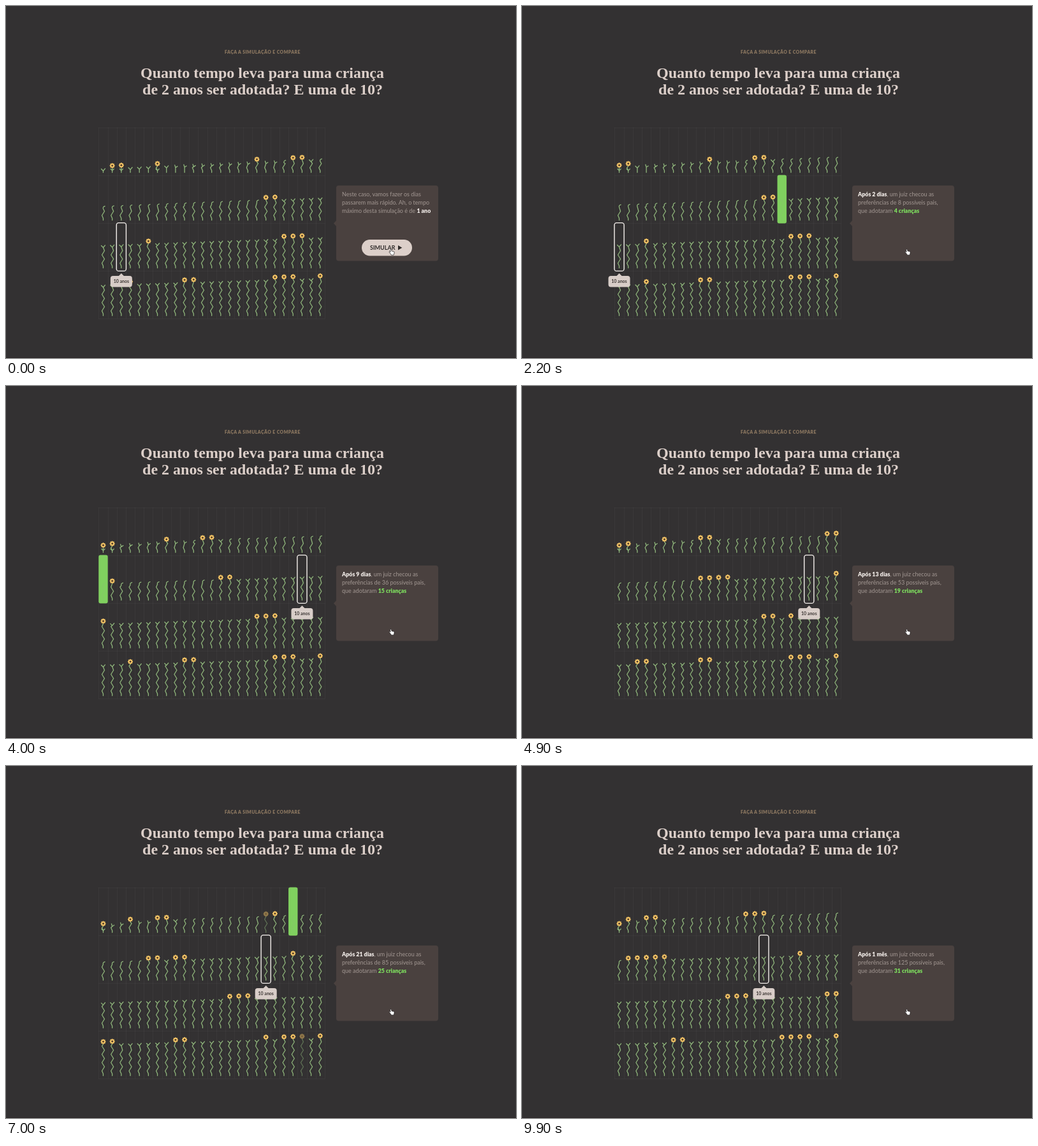
An HTML page with a canvas that plays this animation: 800x553 px, repeating every 10 s.

```html
<!DOCTYPE html>
<html lang="pt-BR">
<head>
<meta charset="utf-8">
<title>Simulação</title>
<style>
  html, body { margin: 0; width: 100%; height: 100%; overflow: hidden; background: #333132; }
  canvas, svg { position: absolute; left: 0; top: 0; width: 800px; height: 553px; }
  text { white-space: pre; font-family: Lato, sans-serif; }
  .eyebrow { font-size: 6.9px; font-weight: 900; letter-spacing: .45px; fill: #8f7a62; }
  .title { font: 700 24px "Liberation Serif", "Noto Serif", serif; fill: #dccfc9; }
  .note { font-size: 9px; fill: #a39893; }
  .strong, .count { font-size: 8.8px; font-weight: 900; }
  .strong { fill: #f5efeb; }
  .count { fill: #7fe25f; }
  .button { font-size: 9px; font-weight: 700; fill: #2f2b2a; }
  .tip { font-size: 7px; font-weight: 700; fill: #3a3432; }
</style>
</head>
<body>
<canvas></canvas>
<svg viewBox="0 0 800 553">
  <text class="eyebrow" x="402.5" y="75" text-anchor="middle">FAÇA A SIMULAÇÃO E COMPARE</text>
  <text class="title" x="402" y="113" text-anchor="middle">Quanto tempo leva para uma criança</text>
  <text class="title" x="402.5" y="139" text-anchor="middle">de 2 anos ser adotada? E uma de 10?</text>
  <text class="note" x="527" y="299"></text>
  <text class="note" x="527" y="312"></text>
  <text class="note" x="527" y="325"></text>
  <g id="button">
    <rect x="558" y="367" width="79" height="25.5" rx="12.7" fill="#dccfc9"/>
    <text class="button" x="571" y="383">SIMULAR</text>
    <path d="M615 376v7.4l6.3-3.7z" fill="#2f2b2a"/>
  </g>
  <path d="M603.2 389.2l-2-2.4q-.5-1.1.7-1.2l1.3.8-.6-3.2q.1-1.2 1-1.1.7 0 .9 1l.5 1.9 3 .5q1.2.4 1.1 1.7l-.4 2.4-.7 1.6h-3.6z"
    fill="#fff" stroke="#1d1a1a" stroke-width=".7" stroke-linejoin="round"/>
  <text class="tip" id="tip" text-anchor="middle">10 anos</text>
</svg>
<script>
const LOOP = 10000, STEP = 100;
const COLS = 25, CELLS = 100, LEFT = 145.4, PITCH = 14.18, TOP = 191, ROW = 75;
const STEM = '#90b77c', PETAL = '#f4c566', CORE = '#4a3323', PALE = '#d8cdc8';
const MARKED = 52;

// Plants are numbered by age. The queue moves left: how far, and how late, by age.
const reach = [
  [0, 0], [6, 6], [17, 16], [22, 18], [45, 14.9], [52, 10.8], [72, 7.8], [84, 3], [96, 1], [99, 0]
];
const delay = [[0, 0], [44, 1], [52, .85], [73, 1.5], [84, 3.5], [99, 4]];

const inBloom = [1, 2, 6, 17, 21, 22, 43, 44, 55, 70, 71, 72, 78, 84, 85, 94, 95, 96, 99];
// [age, moment of blooming]
const laterBlooms = [
  [33, 2900], [32, 3400], [41, 4500], [42, 4500], [79, 4700], [31, 7000], [97, 7000], [45, 9000]
];
const blooms = [...inBloom.map(age => [age, -LOOP]), ...laterBlooms];

// Totals by day
const couples = [[1, 3], [5, 22], [9, 36], [15, 62], [27, 108], [33, 125]];
const children = [[1, 2], [5, 11], [9, 15], [15, 21], [27, 29], [33, 31]];

const canvas = document.querySelector('canvas');
const ctx = canvas.getContext('2d');
const dpr = window.devicePixelRatio || 1;
canvas.width = 800 * dpr;
canvas.height = 553 * dpr;
const button = document.getElementById('button');
const tip = document.getElementById('tip');
const notes = document.querySelectorAll('.note');

const clamp = x => Math.min(1, Math.max(0, x));

function curve(points, x) {
  let i = 1;
  while (i < points.length - 1 && points[i][0] < x) i++;
  const [x0, y0] = points[i - 1], [x1, y1] = points[i];
  return y0 + (y1 - y0) * clamp((x - x0) / (x1 - x0));
}

function cellOf(age, t) {
  if (t < 1300) return age;
  const first = age > 3 && age < 75 ? 1 : 0;
  const end = age > 50 ? 8400 : 9900;
  const u = clamp((t - 1500) / (end - 1500));
  const moved = u ? (curve(reach, age) - first) * u ** curve(delay, age) : 0;
  return age - Math.round(first + moved);
}

const heightOf = age => 10 + .65 * age - .0012 * age * age;
const cellX = p => LEFT + PITCH * (p % COLS + .5);
const cellTop = p => TOP + ROW * Math.floor(p / COLS);

function box(x, y, w, h, r) {
  ctx.beginPath();
  ctx.roundRect(x, y, w, h, r);
}

function flower(x, y) {
  ctx.fillStyle = PETAL;
  ctx.beginPath();
  for (let i = 0; i < 8; i++) {
    const a = i * Math.PI / 4, px = x + 3 * Math.cos(a), py = y + 3 * Math.sin(a);
    ctx.moveTo(px + 1.15, py);
    ctx.arc(px, py, 1.15, 0, 7);
  }
  ctx.moveTo(x + 2.7, y);
  ctx.arc(x, y, 2.7, 0, 7);
  ctx.fill();
  ctx.fillStyle = CORE;
  ctx.beginPath();
  ctx.arc(x, y, 1.4, 0, 7);
  ctx.fill();
}

function crown(x, top, age) {
  if (age < 8 || (age > 20 && age < 24) || age > 42) {
    ctx.moveTo(x - 3, top - 3);
    ctx.lineTo(x, top);
    ctx.lineTo(x + 3, top - 3.6);
  } else if (age < 20) {
    ctx.lineTo(x - 1.2, top - 4);
    ctx.moveTo(x, top);
    ctx.lineTo(x + 3, top - 2);
  } else {
    ctx.quadraticCurveTo(x - 1, top - 3, x + 2.6, top - 4);
  }
}

function plant(x, base, age, open) {
  const full = heightOf(age);
  const height = full - (open ? 4 : 7.5);
  const top = base - height;
  let side = -1;
  ctx.beginPath();
  ctx.moveTo(x, base);
  ctx.lineTo(x, base - Math.min(3, height));
  for (let y = 7.5; y < height - 1; y += 6.5) {
    ctx.lineTo(x + side * 2, base - y);
    side = -side;
  }
  ctx.lineTo(x, top);
  if (!open) crown(x, top, age);
  else if (full < 18) {
    ctx.moveTo(x - 2.6, base - 5.5);
    ctx.lineTo(x, base - 3);
    ctx.lineTo(x + 2.6, base - 5.5);
  }
  ctx.stroke();
  if (open) flower(x, base - full);
}

function grid() {
  ctx.strokeStyle = 'rgba(255,255,255,.035)';
  ctx.lineWidth = 1;
  ctx.beginPath();
  for (let i = 0; i <= COLS; i++) {
    const x = Math.round(LEFT + i * PITCH) + .5;
    ctx.moveTo(x, TOP);
    ctx.lineTo(x, TOP + 4 * ROW);
  }
  for (let r = 0; r <= 4; r++) {
    ctx.moveTo(LEFT, TOP + r * ROW + .5);
    ctx.lineTo(LEFT + COLS * PITCH, TOP + r * ROW + .5);
  }
  ctx.stroke();
}

// Two adoptions per 1200 ms, each flashing for 300 ms
function adoptionAt(t) {
  if (t < 1600) return null;
  const round = Math.floor((t - 1600) / 1200), time = (t - 1600) % 1200;
  const late = time >= 500;
  const age = late ? time - 500 : time;
  return age < 300 ? { cell: (36 + 17 * round + (late ? 7 : 0)) % 45, folding: age >= 200 } : null;
}

function adopted(p, folding, age) {
  const x = cellX(p), y = cellTop(p);
  if (!folding) {
    ctx.fillStyle = '#80d05f';
    box(x - 7.2, y - .5, 14.4, 76, 3);
    ctx.fill();
    ctx.globalAlpha = .3;
    plant(x, y + 70, age, false);
    ctx.globalAlpha = 1;
    return;
  }
  ctx.fillStyle = '#5d9350';
  ctx.beginPath();
  ctx.moveTo(x - 5, y);
  ctx.lineTo(x + 5, y);
  ctx.quadraticCurveTo(x + 7.5, y, x + 7.5, y + 3);
  ctx.lineTo(x + 7.5, y + 72);
  ctx.quadraticCurveTo(x + 7.5, y + 75, x + 5, y + 75);
  ctx.lineTo(x - .5, y + 75);
  ctx.lineTo(x - 1, y + 64);
  ctx.quadraticCurveTo(x + 5, y + 58, x + 6, y + 36);
  ctx.lineTo(x + 6, y + 14);
  ctx.quadraticCurveTo(x + 5, y + 5, x - 1, y + 4);
  ctx.fill();
  ctx.globalAlpha = .75;
  for (let i = 0; i < 3; i++) {
    plant(x - 2 + i * 2.5, y + 66, age + 8 * i, false);
    flower(x - 1 + i % 2 * 6, y + 38 + i * 6.5);
  }
  ctx.globalAlpha = 1;
}

function panel() {
  ctx.fillStyle = '#4a413f';
  box(518, 282, 160, 118.5, 4);
  ctx.fill();
  ctx.beginPath();
  ctx.moveTo(518.5, 336.5);
  ctx.lineTo(514, 341.5);
  ctx.lineTo(518.5, 346.5);
  ctx.fill();
}

function mark(p) {
  const x = cellX(p), y = cellTop(p);
  ctx.strokeStyle = '#f4efec';
  ctx.lineWidth = 1.4;
  box(x - 7.6, y - .4, 15.2, 75.8, 3.5);
  ctx.stroke();
  ctx.fillStyle = PALE;
  box(x - 17, y + 83, 34, 17.5, 4);
  ctx.fill();
  ctx.beginPath();
  ctx.moveTo(x - 4.5, y + 83.5);
  ctx.lineTo(x, y + 79);
  ctx.lineTo(x + 4.5, y + 83.5);
  ctx.fill();
  tip.setAttribute('x', x);
  tip.setAttribute('y', y + 94.3);
}

const span = (cls, s) => `<tspan class="${cls}">${s}</tspan>`;

function story(t) {
  if (t < 1300) return [
    'Neste caso, vamos fazer os dias',
    'passarem mais rápido. Ah, o tempo',
    'máximo desta simulação é de ' + span('strong', '1 ano')
  ];
  const day = Math.max(1, 1 + Math.floor((t - 1950) / 245));
  const pairs = Math.round(curve(couples, day));
  const kids = span('count', Math.round(curve(children, day)) + ' crianças');
  if (day === 1) return [
    span('strong', 'No primeiro dia') + ', um juiz checou as',
    `preferências de ${pairs} possíveis pais, que`,
    'adotaram ' + kids
  ];
  return [
    span('strong', 'Após ' + (day < 30 ? day + ' dias' : '1 mês')) + ', um juiz checou as',
    `preferências de ${pairs} possíveis pais,`,
    'que adotaram ' + kids
  ];
}

function agesAt(t) {
  const ages = [];
  for (let age = 0; age < CELLS; age++) {
    const p = cellOf(age, t);
    while (ages.length <= p) ages.push(age);
    ages[p] = age;
  }
  return ages;
}

function garden(t) {
  const ages = agesAt(t), open = new Map();
  for (const [age, start] of blooms) {
    const p = cellOf(age, t);
    if (t >= start) open.set(p, t < start + 200 ? .5 : 1);
    if (t >= start) ages[p] = age;
  }
  const leaving = adoptionAt(t);
  ctx.strokeStyle = STEM;
  ctx.lineWidth = 1.3;
  ctx.lineJoin = ctx.lineCap = 'round';
  for (let p = 0; p < CELLS; p++) {
    if (leaving && leaving.cell === p) continue;
    ctx.globalAlpha = open.get(p) || 1;
    plant(cellX(p), cellTop(p) + 70.5, ages[p], open.has(p));
  }
  ctx.globalAlpha = 1;
  if (leaving) adopted(leaving.cell, leaving.folding, ages[leaving.cell]);
}

function draw(t) {
  ctx.setTransform(dpr, 0, 0, dpr, 0, 0);
  ctx.fillStyle = '#333132';
  ctx.fillRect(0, 0, 800, 553);
  ctx.fillStyle = '#2a2425';
  ctx.fillRect(0, 552, 800, 1);
  grid();
  panel();
  garden(t);
  mark(cellOf(MARKED, t));
  button.setAttribute('opacity', clamp((2100 - t) / 300));
  story(t).forEach((line, i) => {
    if (notes[i].line !== line) notes[i].innerHTML = notes[i].line = line;
  });
}

const began = performance.now();
function tick() {
  const t = (performance.now() - began) % LOOP;
  draw(Math.floor(t / STEP) * STEP);
  requestAnimationFrame(tick);
}
tick();
</script>
</body>
</html>
```
